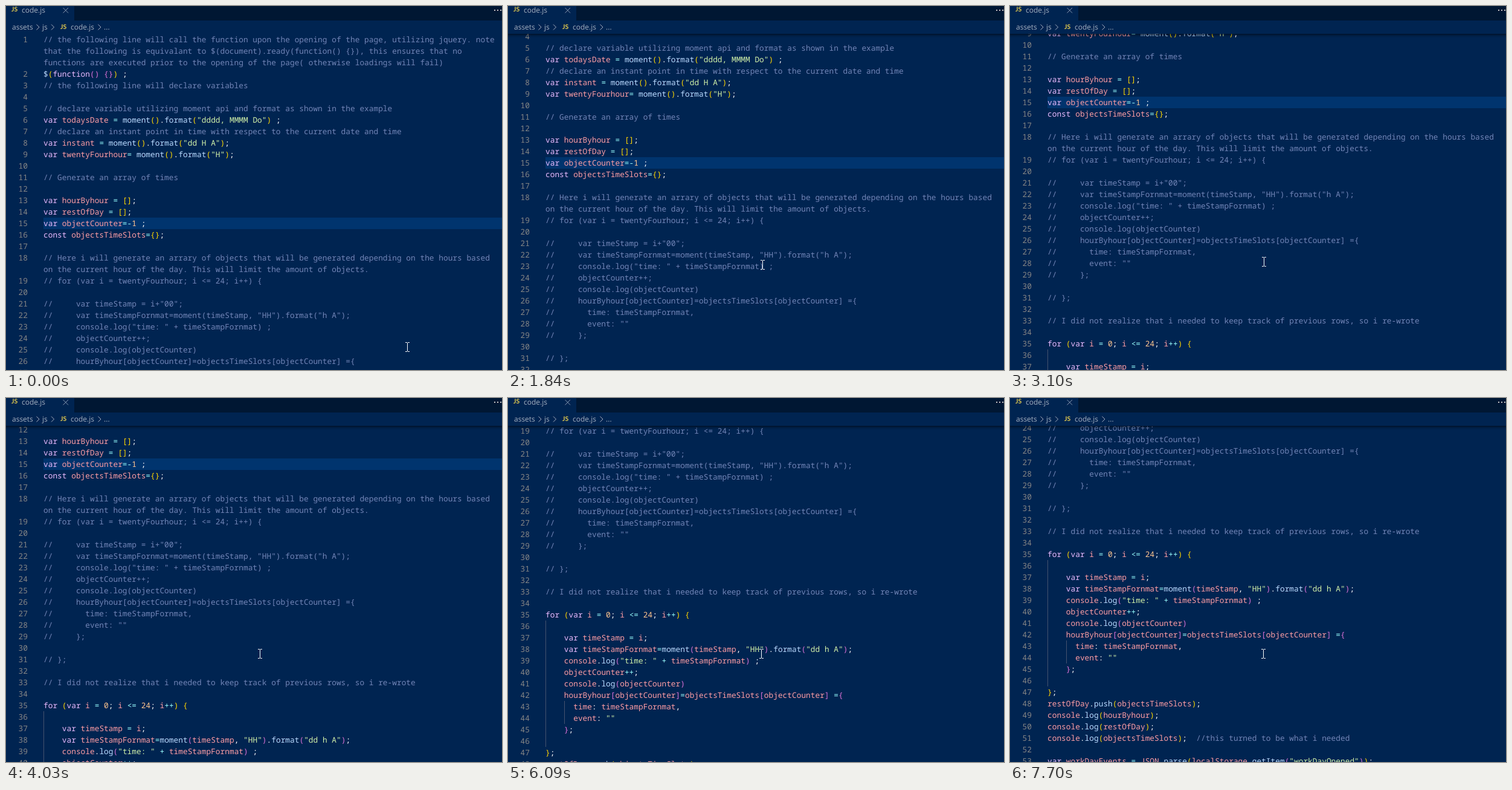
These frames come from a looping animation (821 px wide and 602 px high, 8000 ms). An HTML page:

```html
<!DOCTYPE html>
<html lang="en">
<head>
<meta charset="utf-8">
<title>code.js</title>
<style>
html, body { margin: 0; width: 100%; height: 100%; overflow: hidden; background: #002451; }
body { position: relative; text-rendering: geometricPrecision; }
body *, #code > i { position: absolute; white-space: pre; }
#code span { position: static; }
#bar { inset: 0 0 auto; height: 24px; background: #001733; }
#tab { left: 0; top: 0; width: 113px; height: 24px; background: #002451; }
.ui { font: 12px/18px "Open Sans", "Noto Sans", sans-serif; color: #a5afc0; }
.ui.js { font: bold 10.5px/18px Lato, sans-serif; color: #e3cb4e; }
#view { inset: 46px 0 0; overflow: hidden; }
#shade { inset: 46px 0 auto; height: 6px; box-shadow: inset 0 6px 6px -6px #000; }
#code, #nums { top: 0; font: 12.83px/19px "Noto Sans Mono", monospace; color: #fff; }
#code { left: 62px; }
#nums { left: 0; width: 36px; text-align: right; color: #858585; }
#scroll { left: 0; top: 0; width: 100%; }
#line { left: 62px; right: 0; top: 304px; height: 19px; background: #00346e; }
.guide { width: 1px; background: #46536f; }
svg { left: 0; top: 0; fill: none; }
</style>
</head>
<body>
<div id="view"><div id="scroll">
  <div id="line"></div>
  <div class="guide" style="left:62px;top:722px;height:209px"></div>
  <div class="guide" style="left:93px;top:855px;height:38px"></div>
  <div id="nums"></div><div id="code"></div>
</div></div>
<div id="shade"></div>
<div id="bar"><div id="tab"></div></div>
<div class="ui js" style="left:9px;top:-3px">JS</div>
<div class="ui" style="left:26px;top:-2px">code.js</div>
<div class="ui" style="left:10px;top:26px">assets</div>
<div class="ui" style="left:60px;top:26px">js</div>
<div class="ui js" style="left:90px;top:26px">JS</div>
<div class="ui" style="left:107px;top:26px">code.js</div>
<div class="ui" style="left:162px;top:26px">...</div>
<svg width="821" height="46">
  <path stroke="#a5afc0" d="M50.5 30.5l4.5 4.5-4.5 4.5M75 30.5l4.5 4.5-4.5 4.5M152.5 30.5l4.5 4.5-4.5 4.5"/>
  <path stroke="#8798b0" d="M94.5 3l8.5 8.5M103 3l-8.5 8.5"/>
  <path stroke="#c5c5c5" stroke-width="2" d="M808 7h2m3 0h2m3 0h2"/>
</svg>
<svg id="mouse" width="7" height="16"><path stroke="#fff" d="M0 .5h3m1 0h3M3.5 1v14M0 15.5h3m1 0h3"/></svg>
<script>
// A leading ~ marks the wrapped rest of a comment.
const source = `// the following line will call the function upon the opening of the page, utilizing jquery. note
~that the following is equivalant to $(document).ready(function() {}), this ensures that no
~functions are executed prior to the opening of the page( otherwise loadings will fail)
$(function() {}) ;
// the following line will declare variables

// declare variable utilizing moment api and format as shown in the example
var todaysDate = moment().format("dddd, MMMM Do") ;
// declare an instant point in time with respect to the current date and time
var instant = moment().format("dd H A");
var twentyFourhour= moment().format("H");

// Generate an array of times

var hourByhour = [];
var restOfDay = [];
var objectCounter=-1 ;
const objectsTimeSlots={};

// Here i will generate an arrary of objects that will be generated depending on the hours based
~on the current hour of the day. This will limit the amount of objects.
// for (var i = twentyFourhour; i <= 24; i++) {

//     var timeStamp = i+"00";
//     var timeStampFornmat=moment(timeStamp, "HH").format("h A");
//     console.log("time: " + timeStampFornmat) ;
//     objectCounter++;
//     console.log(objectCounter)
//     hourByhour[objectCounter]=objectsTimeSlots[objectCounter] ={
//       time: timeStampFornmat,
//       event: ""
//     };

// };

// I did not realize that i needed to keep track of previous rows, so i re-wrote

for (var i = 0; i <= 24; i++) {

    var timeStamp = i;
    var timeStampFornmat=moment(timeStamp, "HH").format("dd h A");
    console.log("time: " + timeStampFornmat) ;
    objectCounter++;
    console.log(objectCounter)
    hourByhour[objectCounter]=objectsTimeSlots[objectCounter] ={
      time: timeStampFornmat,
      event: ""
    };

};
restOfDay.push(objectsTimeSlots);
console.log(hourByhour);
console.log(restOfDay);
console.log(objectsTimeSlots);  //this turned to be what i needed

var workDayEvents = JSON.parse(localStorage.getItem("workDayOpened"));`;

const $ = id => document.getElementById(id);
const token = /([~]|\/\/).*|("[^"]*")|\b(var|const|for|function)\b|(\d+)|([$\w]+(?=\())|(\w+)|([-+=<>]+)|([([{])|([)\]}])|[^]/g;
const colors = ["#7285b7", "#d1f1a9", "#ebbbff", "#ffc58f", "#bbdaff", "#ff9da4", "#99ffff"];
const pairs = ["#ffd700", "#da70d6", "#179fff"];
let depth = 0;
for (const m of source.matchAll(token)) {
  const kind = m.slice(1).findIndex(Boolean);
  const span = document.createElement("span");
  span.textContent = m[0].replace("~", "");
  if (kind === 7) span.style.color = pairs[depth++ % 3];
  else if (kind === 8) span.style.color = pairs[--depth % 3];
  else if (kind >= 0) span.style.color = colors[kind];
  $("code").append(span);
}
let number = 0;
$("nums").textContent = source.split("\n").map(s => s[0] === "~" ? "" : ++number).join("\n");

// Each wheel notch scrolls 50 px at once.
const notches = [815, 1460, 2230, 3100, 4030, 4890, 5960, 6090, 6890, 7700];
// Pointer moves: first step, last step, step count, destination.
const moves = [
  [70, 480, 7, 430, 453],
  [680, 950, 5, 424, 434],
  [1090, 1840, 12, 421, 428],
  [2370, 2570, 4, 420, 423],
  [5640, 5640, 1, 419, 423]
];

function pointer(t) {
  let x = 664, y = 564;
  for (const [from, to, steps, toX, toY] of moves) {
    if (t < from) break;
    const gap = (to - from) / (steps - 1) || 1;
    const p = Math.min(1, (Math.floor((t - from) / gap + 1e-6) + 1) / steps);
    const ease = p * (2 - p);
    x += (toX - x) * ease;
    y += (toY - y) * ease;
  }
  return [Math.round(x), Math.round(y)];
}

function draw(now) {
  const t = now % 8000;
  const scroll = 50 * notches.filter(n => t >= n).length;
  const [x, y] = pointer(t);
  $("scroll").style.top = -scroll + "px";
  $("shade").hidden = !scroll;
  $("mouse").style.left = x - 3 + "px";
  $("mouse").style.top = y - 8 + "px";
  requestAnimationFrame(draw);
}
draw(0);
</script>
</body>
</html>
```
